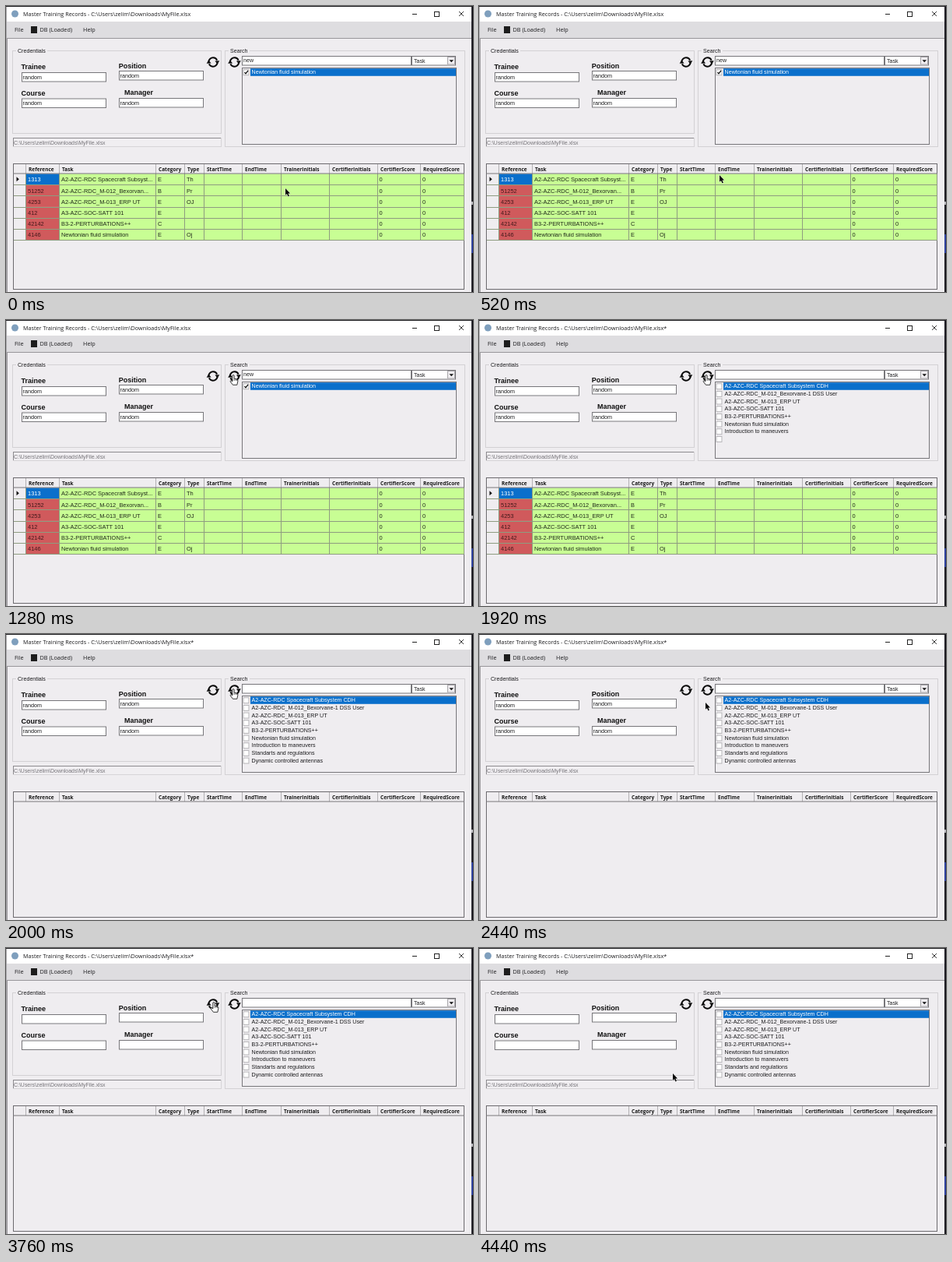
Write an HTML page with a canvas that moves like this. It is 600x367 px and loops after 4480 ms.

```html
<!DOCTYPE html>
<html lang="en">
<head>
<meta charset="utf-8">
<title>Training records</title>
<style>
html, body { margin: 0; width: 100%; height: 100%; overflow: hidden; background: #efedf0; }
canvas { display: block; width: 600px; height: 367px; }
</style>
</head>
<body>
<canvas id="stage" width="600" height="367"></canvas>
<script>
const ctx = document.getElementById('stage').getContext('2d');
const LOOP = 4480;
const UI = '"Open Sans", "Noto Sans", sans-serif';
const SANS = '"Liberation Sans", Arial, sans-serif';
const BG = '#efedf0', GREEN = '#c8fe94', RED = '#d05a5c', BLUE = '#0a6fcb', INK = '#1c1c1e';
const EDGE = '#77767a';
const PATH = 'C:\\Users\\zelim\\Downloads\\MyFile.xlsx';

// Moments when the window content changes
const T = { refill: 1880, filled: 1960, clearTable: 1960, clearForm: 3600 };

const tasks = [
  'A2-AZC-RDC Spacecraft Subsystem CDH',
  'A2-AZC-RDC_M-012_Bexorvane-1 DSS User',
  'A2-AZC-RDC_M-013_ERP UT',
  'A3-AZC-SOC-SATT 101',
  'B3-2-PERTURBATIONS++',
  'Newtonian fluid simulation',
  'Introduction to maneuvers',
  'Standarts and regulations',
  'Dynamic controlled antennas'
];

const rows = [
  ['1313', 'A2-AZC-RDC Spacecraft Subsyst...', 'E', 'Th'],
  ['51252', 'A2-AZC-RDC_M-012_Bexorvan...', 'B', 'Pr'],
  ['4253', tasks[2], 'E', 'OJ'],
  ['412', tasks[3], 'E', ''],
  ['42142', tasks[4], 'C', ''],
  ['4146', tasks[5], 'E', 'Oj']
];

// Left edge of each column and its heading
const cols = [
  [25, 'Reference'], [68, 'Task'], [192, 'Category'], [229, 'Type'], [254, 'StartTime'],
  [303, 'EndTime'], [353, 'TrainerInitials'], [415, 'CertifierInitials'],
  [477, 'CertifierScore'], [532, 'RequiredScore']
];

const fields = [
  ['Trainee', 19.5, 81, 20, 85], ['Position', 144.7, 80.3, 145, 83],
  ['Course', 19.5, 115, 20, 118.5], ['Manager', 152, 114.3, 145, 118]
];

// Pointer stops: time, x, y
const stops = [
  [0, 359, 234], [200, 352, 232], [520, 309, 217], [680, 300, 190], [1080, 292, 71],
  [2120, 292, 71], [2360, 291, 88], [2880, 291, 88], [3240, 267, 70],
  [3960, 267, 70], [4400, 249, 161], [LOOP, 249, 161]
];

function rect(x, y, w, h, fill) {
  ctx.fillStyle = fill;
  ctx.fillRect(x, y, w, h);
}

function frame(x, y, w, h, color, fill) {
  if (fill) rect(x, y, w, h, fill);
  ctx.strokeStyle = color;
  ctx.lineWidth = 1;
  ctx.strokeRect(x + 0.5, y + 0.5, w - 1, h - 1);
}

function text(str, x, y, size, color = INK, family = SANS, weight = 'normal') {
  ctx.font = `${weight} ${size}px ${family}`;
  ctx.fillStyle = color;
  ctx.fillText(str, x, y);
}

function poly(points, fill) {
  ctx.beginPath();
  points.forEach(([x, y]) => ctx.lineTo(x, y));
  ctx.closePath();
  ctx.fillStyle = fill;
  ctx.fill();
}

function line(points, color, width) {
  ctx.beginPath();
  points.forEach(([x, y], i) => i ? ctx.lineTo(x, y) : ctx.moveTo(x, y));
  ctx.strokeStyle = color;
  ctx.lineWidth = width;
  ctx.stroke();
}

function group(title, x, y, w, h, gap) {
  frame(x, y, w, h, '#d3d1d4');
  rect(x + 5, y - 2, gap, 5, BG);
  text(title, x + 7, y + 3, 7.1);
}

function refreshIcon(x, y) {
  ctx.save();
  ctx.translate(x, y);
  for (let i = 0; i < 2; i++) {
    ctx.beginPath();
    ctx.arc(0, 0, 5.7, Math.PI * 1.02, Math.PI * 1.86);
    ctx.strokeStyle = '#0a0a0a';
    ctx.lineWidth = 2;
    ctx.stroke();
    poly([[2.4, -1.6], [8.3, -1.8], [5.7, 2.4]], '#0a0a0a');
    ctx.rotate(Math.PI);
  }
  ctx.restore();
}

function titleBar(edited) {
  rect(0, 0, 600, 367, BG);
  rect(0, 1, 598, 19, '#fff');
  rect(0, 0, 600, 1, '#1b1a1d');
  ctx.beginPath();
  ctx.arc(11.5, 10, 4.5, 0, Math.PI * 2);
  ctx.fillStyle = '#7f9fbd';
  ctx.fill();
  text('Master Training Records - ' + PATH + (edited ? '*' : ''), 22, 13, 7.22, INK, UI);
  line([[522, 10.5], [528, 10.5]], '#222', 1);
  frame(550, 7, 7, 7, '#222');
  line([[582, 7], [588, 13]], '#222', 0.9);
  line([[588, 7], [582, 13]], '#222', 0.9);

  rect(0, 20, 598, 21, '#dedde0');
  rect(0, 41, 598, 1, '#98969a');
  text('File', 11, 33.3, 7.3, INK, UI);
  rect(32, 26, 8, 9, '#1d1d1d');
  text('DB (Loaded)', 43.5, 33.3, 7.3, INK, UI);
  text('Help', 99, 33.3, 7.3, INK, UI);
}

function credentials(value) {
  group('Credentials', 8, 57, 269, 107, 40);
  for (const [label, lx, ly, x, y] of fields) {
    text(label, lx, ly, 9, '#111', SANS, 'bold');
    frame(x, y, 109, 12.5, EDGE, '#fff');
    text(value, x + 1.5, y + 8.8, 7.2);
  }
  refreshIcon(266, 72);
  rect(9, 169, 268, 12, '#f0eef1');
  rect(9, 169, 268, 1, '#8d8b8f');
  rect(9, 169, 1, 12, '#8d8b8f');
  rect(9, 180, 268, 1, '#d6d4d7');
  rect(276, 169, 1, 12, '#d6d4d7');
  text(PATH, 10, 177.6, 6.95, '#77757a');
}

function checkItem(i, label, checked) {
  const y = 80.2 + i * 9.67;
  if (i === 0) rect(314, y, 264, 9.6, BLUE);
  frame(304.5, y + 1, 8, 8, '#b3b1b5', '#fff');
  if (checked) line([[306.5, y + 4.9], [308, y + 6.7], [311, y + 2.7]], '#000', 1.2);
  text(label, 315.6, y + 7.2, 7.1, i ? INK : '#fff');
}

function search(t) {
  group('Search', 281, 57, 309, 124, 27);
  refreshIcon(293.5, 72);
  frame(303, 64, 218, 12.5, EDGE, '#fff');
  frame(521, 64, 57, 12.5, EDGE, '#fff');
  frame(567, 65, 10, 10.5, '#a5a3a7', '#f0eef1');
  poly([[569.5, 69.3], [575, 69.3], [572.2, 72.3]], '#111');
  text('Task', 524, 73, 7);
  frame(303, 79, 276, 99, EDGE, BG);
  if (t < T.refill) {
    text('new', 305, 72.3, 7.1);
    checkItem(0, tasks[5], true);
    return;
  }
  const filling = t < T.filled;
  const list = filling ? tasks.slice(0, 7).concat('') : tasks;
  list.forEach((label, i) => checkItem(i, label, false));
}

function table(full) {
  frame(9, 202, 580, 162, '#6c6a6e', BG);
  if (full) tableRows();
  cols.forEach(([x, label]) => {
    rect(x, 203, 1, 12, '#b3b1b4');
    text(label, x + 4, 211.6, 6.5, '#161616', UI, 'bold');
  });
  rect(9, 214.5, 580, 1, '#7b797d');
}

function tableRows() {
  const h = 14.2;
  const grid = '#8e9c80';
  rows.forEach(([ref, task, category, type], i) => {
    const y = 215.3 + i * h;
    const base = y + 10;
    rect(25, y, 43, h, i ? RED : BLUE);
    rect(68, y, 520, h, GREEN);
    text(ref, 28, base, 7.45, i ? '#43191b' : '#fff');
    [[task, 71], [category, 195], [type, 232], ['0', 479.5], ['0', 535]]
      .forEach(([str, x]) => text(str, x, base, 7.45, '#20281a'));
  });
  for (let i = 1; i <= rows.length; i++) rect(10, Math.round(215 + i * h), 579, 1, grid);
  cols.forEach(([x]) => rect(x, 215, 1, 86, grid));
  rect(588, 215, 1, 86, grid);
  poly([[13.5, 219.2], [16.8, 222.2], [13.5, 225.2]], '#111');
}

function edges() {
  rect(0, 1, 1, 366, '#a9a7aa');
  rect(1, 41, 1, 326, '#98969a');
  rect(598, 0, 2, 367, '#1d1c22');
  rect(598, 251, 2, 4, '#b9b8bd');
  rect(598, 293, 2, 24, '#2c3f9c');
}

function pointerAt(t) {
  let i = 1;
  while (i < stops.length - 1 && t > stops[i][0]) i++;
  const [t0, x0, y0] = stops[i - 1];
  const [t1, x1, y1] = stops[i];
  const p = Math.min(1, (t - t0) / (t1 - t0));
  const k = p * p * (3 - 2 * p);
  return [x0 + (x1 - x0) * k, y0 + (y1 - y0) * k];
}

function arrow() {
  const shape = [[0, 0], [0, 9.5], [2.1, 7.6], [3.8, 11.3], [5.3, 10.6], [3.7, 7.1], [6.6, 6.9]];
  line(shape.concat([shape[0]]), '#fff', 0.8);
  poly(shape, '#050505');
}

function hand() {
  ctx.beginPath();
  ctx.moveTo(-1.2, 0.2);
  ctx.quadraticCurveTo(0, -1.2, 1.2, 0.2);
  ctx.lineTo(1.2, 4.4);
  ctx.lineTo(5.2, 5.6);
  ctx.quadraticCurveTo(6.6, 6, 6.3, 8);
  ctx.lineTo(5.2, 13.2);
  ctx.lineTo(-0.6, 13.2);
  ctx.lineTo(-4.4, 8.2);
  ctx.quadraticCurveTo(-4, 6.2, -1.2, 8.4);
  ctx.closePath();
  ctx.fillStyle = '#fff';
  ctx.fill();
  ctx.strokeStyle = '#111';
  ctx.lineWidth = 0.9;
  ctx.stroke();
  [1.2, 3.1, 4.9].forEach(x => line([[x, 4.2 + x * 0.3], [x, 7.6]], '#111', 0.6));
}

function pointer(t) {
  const [x, y] = pointerAt(t);
  const overIcon = [266, 293.5].some(cx => Math.abs(x - cx) < 9) && y > 63 && y < 81;
  ctx.save();
  ctx.translate(x, y);
  ctx.scale(0.93, 0.93);
  overIcon ? hand() : arrow();
  ctx.restore();
}

function draw(now) {
  const t = now % LOOP;
  titleBar(t >= T.refill);
  credentials(t < T.clearForm ? 'random' : '');
  search(t);
  table(t < T.clearTable);
  edges();
  pointer(t);
}

const start = performance.now();
function tick(now) {
  draw(Math.max(0, now - start));
  requestAnimationFrame(tick);
}
draw(0);
requestAnimationFrame(tick);
</script>
</body>
</html>
```
